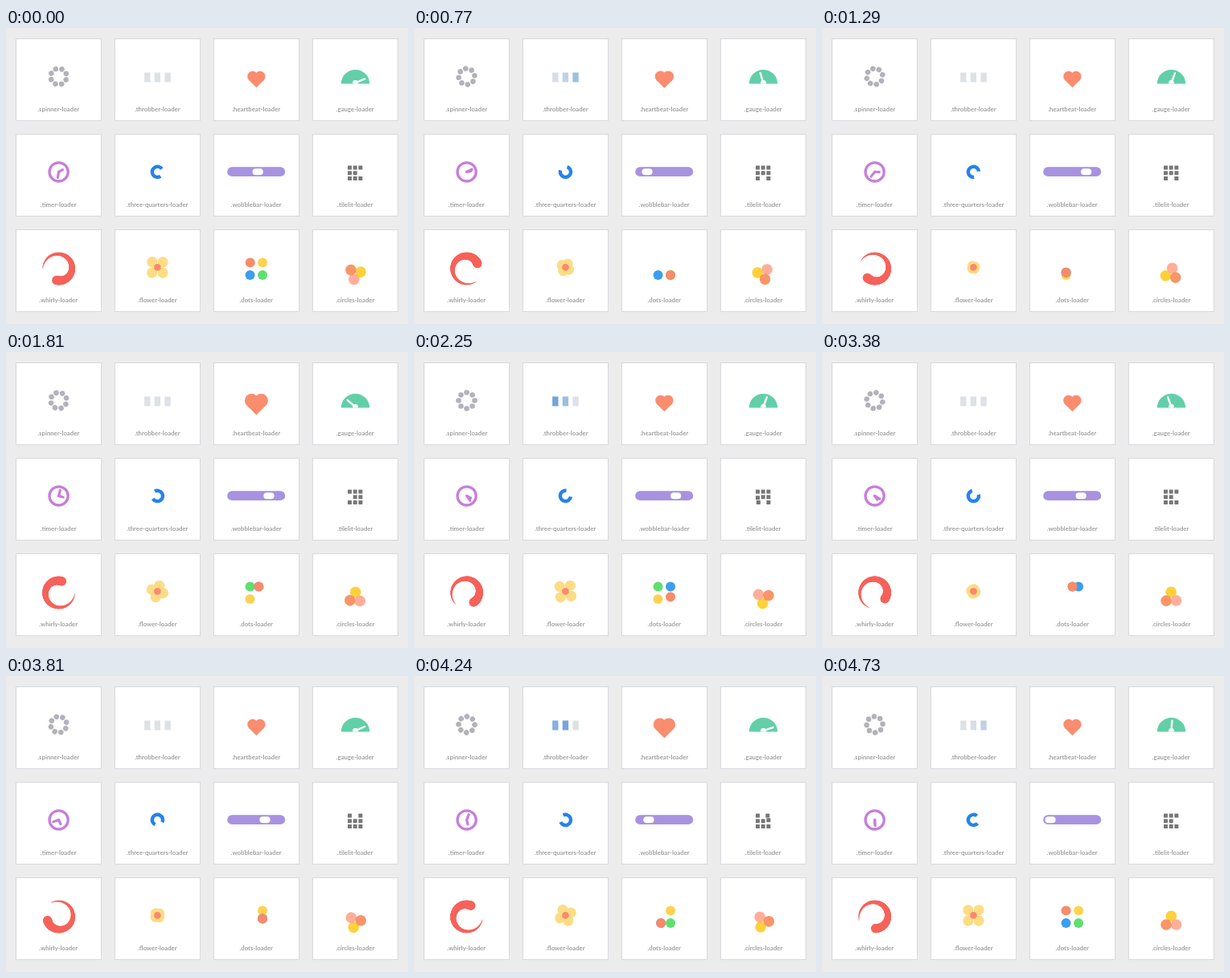
An HTML page with a canvas that plays this animation: 500 by 369 pixels, repeating every 4820 ms.

```html
<!DOCTYPE html>
<html lang="en">
<head>
<meta charset="utf-8">
<title>Loaders</title>
<style>
  html, body { margin: 0; width: 100%; height: 100%; overflow: hidden; background: #ececec; }
  #cards {
    position: absolute; left: 12px; top: 13px; display: grid; gap: 16px 16.5px;
    grid-template-columns: repeat(4, 106.5px); grid-auto-rows: 103px;
  }
  #cards div {
    box-sizing: border-box; padding-top: 82px; border: 1px solid #d9d9df; background: #fff;
    color: #a0a0a0; font: bold 7.75px/10px Lato, sans-serif; text-align: center; white-space: nowrap;
  }
  canvas { position: absolute; left: 0; top: 0; width: 500px; height: 369px; }
</style>
</head>
<body>
<div id="cards"></div>
<canvas></canvas>
<script>
const names = 'spinner throbber heartbeat gauge timer three-quarters wobblebar tilelit whirly flower dots circles';
for (const name of names.split(' ')) {
  const card = document.createElement('div');
  card.textContent = `.${name}-loader`;
  document.getElementById('cards').append(card);
}

const canvas = document.querySelector('canvas');
const dpr = window.devicePixelRatio || 1;
canvas.width = 500 * dpr;
canvas.height = 369 * dpr;
const g = canvas.getContext('2d');

const TAU = Math.PI * 2;
const rad = deg => deg * Math.PI / 180;
const mix = (a, b, f) => a + (b - a) * f;
const clamp = (x, lo, hi) => Math.max(lo, Math.min(hi, x));

// CSS-style cubic-bezier timing function
function bezier(x1, y1, x2, y2) {
  const at = (a, b, s) => 3 * a * s * (1 - s) ** 2 + 3 * b * s * s * (1 - s) + s ** 3;
  return x => {
    let lo = 0, hi = 1;
    for (let i = 0; i < 22; i++) {
      const mid = (lo + hi) / 2;
      if (at(x1, x2, mid) < x) lo = mid; else hi = mid;
    }
    return at(y1, y2, lo);
  };
}
const linear = x => x;
const ease = bezier(.25, .1, .25, 1);
const easeOut = bezier(0, 0, .58, 1);
const easeInOut = bezier(.42, 0, .58, 1);

// Position within a repeating period, in percent
const percent = (t, period) => (t % period) / period * 100;

// Value at p from [percent, value] stops
function keyed(p, stops, curve) {
  let i = 0;
  while (i < stops.length - 2 && p >= stops[i + 1][0]) i++;
  const [p0, v0] = stops[i], [p1, v1] = stops[i + 1];
  return mix(v0, v1, curve(clamp((p - p0) / (p1 - p0), 0, 1)));
}

// Point on a square's outline; corners at 0 (top left), 1, 2, 3 clockwise
function onSquare(u) {
  const wave = v => clamp(Math.abs((v % 4 + 4) % 4 - 2) * 2 - 2, -1, 1);
  return [wave(u + .5 - 2), wave(u - .5 - 2)].map((_, i) => {
    const v = ((u - i + 4) % 4 + 4) % 4;
    return v < 1 ? 2 * v - 1 : v < 2 ? 1 : v < 3 ? 5 - 2 * v : -1;
  });
}

function disc(x, y, r, color) {
  g.fillStyle = color;
  g.beginPath();
  g.arc(x, y, r, 0, TAU);
  g.fill();
}

function pill(x, y, w, h, r, color) {
  g.fillStyle = color;
  g.beginPath();
  g.roundRect(x - w / 2, y - h / 2, w, h, r);
  g.fill();
}

function arc(r, width, color, from = 0, to = TAU) {
  g.strokeStyle = color;
  g.lineWidth = width;
  g.beginPath();
  g.arc(0, 0, r, from, to);
  g.stroke();
}

// Draws in a local frame
function place(x, y, deg, draw) {
  g.save();
  g.translate(x, y);
  g.rotate(rad(deg));
  draw();
  g.restore();
}

function spinner(t) {
  place(65.5, 60.5, t / 1500 * 360, () => {
    for (let i = 0; i < 8; i++) {
      const a = TAU * i / 8;
      disc(10 * Math.cos(a), 10 * Math.sin(a), 3.3, '#b3b2bb');
    }
  });
}

function throbber(t) {
  const idle = [221, 226, 231], lit = [107, 159, 218];
  for (let i = 0; i < 3; i++) {
    const p = percent(t - 150 * (i + 1), 2000);
    const f = keyed(p, [[0, 0], [10, 1], [40, 0], [100, 0]], easeOut);
    const color = idle.map((c, j) => Math.round(mix(c, lit[j], f)));
    pill(188.4 + 12.6 * (i - 1), 61.5, 7.4, 12, 0, `rgb(${color})`);
  }
}

function heartbeat(t) {
  // Two equal beats: up, down, up, slow down
  const beat = [[0, 0], [14, 1], [28, 0], [42, 1], [70, 0], [100, 0]];
  const f = keyed(percent(t, 1300), beat, ease);
  place(311.4, 65 + 1.5 * f, 45, () => {
    const s = 13.1 * (1 + .3 * f), color = '#f98d6e';
    pill(0, 0, s, s, 0, color);
    disc(-s / 2, 0, s / 2, color);
    disc(0, -s / 2, s / 2, color);
  });
}

function gauge(t) {
  const swing = [[0, -50], [10, 20], [20, 60], [25, 60], [40, -20], [54, 70], [62, 70], [70, -20], [84, 22], [100, -50]];
  const x = 434.5, base = 69.6, pivot = 68.4;
  g.save();
  g.fillStyle = '#62cfa8';
  g.beginPath();
  g.arc(x, base, 17.7, Math.PI, 0);
  g.fill();
  g.clip();
  place(x, pivot, keyed(percent(t, 4000), swing, ease), () => pill(0, -7, 2.4, 14, 1.2, '#fff'));
  disc(x, pivot, 3.4, '#fff');
  g.restore();
}

function timer(t) {
  const color = '#c67fdc';
  const hand = (period, length) => place(65.6, 179.4, t / period * 360,
    () => pill(0, length / 2 - .8, 3.2, length + 1.6, 1.6, color));
  place(65.6, 179.4, 0, () => arc(11.6, 3.3, color));
  hand(1250, 8.8);
  hand(15000, 7.2);
}

function threeQuarters(t) {
  place(188.4, 179.4, t / 1250 * 360, () => arc(6.6, 4.4, '#2582ee', rad(45), rad(315)));
}

function wobblebar(t) {
  const slide = [[0, 327], [50, 322], [54, 296], [72, 290], [75, 284], [82, 329], [100, 327]];
  pill(311.2, 179.2, 72, 11.8, 5.9, '#a792e0');
  pill(keyed(percent(t, 4000), slide, ease), 179.2, 13.2, 8, 4, '#fff');
}

// A 3x3 grid whose gap wanders from side to side, two tiles filling it at each move
function tiles(t) {
  const drift = keyed(percent(t, 8000), [[25, 0], [50, 2], [75, -1], [87.5, 0]], linear);
  const side = Math.floor(drift);
  const f = easeInOut(clamp((drift - side - .375) * 4, 0, 1));
  const tile = (x, y) => pill(434.2 + 6.7 * x, 180.8 + 6.7 * y, 5, 5, 0, '#777');
  tile(0, 0);
  for (let i = 1; i < 8; i++) tile(...onSquare(1.5 + side + (i < 3 ? i - f : i) / 2));
}

function whirly(t) {
  place(65.6, 300, t / 1250 * 360, () => {
    for (let i = 0; i <= 140; i++) {
      const f = i / 140, a = rad(91 - 280 * f), r = mix(5.6, .4, f);
      disc((20.3 - r) * Math.cos(a), (20.3 - r) * Math.sin(a), r, '#f6635b');
    }
  });
}

function flower(t) {
  const f = keyed(percent(t, 5000), [[0, 0], [50, 1], [100, 0]], easeInOut);
  const d = 6.65 * (1 - 2 * f);
  place(188.4, 298.4, 1080 * f, () => {
    for (const x of [-d, d]) for (const y of [-d, d]) disc(x, y, 6.6, '#fddc85');
    disc(0, 0, 4.4, '#fa8a6e');
  });
}

// The leader circles the corners; each other dot rides along for two sides, twice per cycle
function dots(t) {
  const step = percent(t, 5000) * .12, whole = Math.floor(step);
  const lead = whole + easeInOut(step - whole);
  const dot = (u, color) => {
    const [x, y] = onSquare(u);
    disc(311.3 + 7.75 * x, 300.3 + 7.75 * y, 6, color);
  };
  const ride = wait => clamp(lead - wait, 0, 2);
  ['#fdd253', '#5fdf70', '#3b9ef0'].forEach((color, i) => {
    const home = i + 1;
    dot(home + ride(home) + ride(home + 6), color);
  });
  dot(lead, '#f98a6a');
}

function circles(t) {
  const turn = keyed(percent(t, 3000), [[0, -720], [50, 720], [100, 0]], easeInOut);
  place(434.3, 306.4, turn, () => {
    g.globalAlpha = .92;
    ['#fdcd28', '#ffa791', '#f98c5c'].forEach((color, i) => {
      const a = rad(120 * i - 90);
      disc(7.2 * Math.cos(a), 7.2 * Math.sin(a), 6.8, color);
    });
  });
}

const LOOP = 4820, STEPS = 56;
const loaders = [
  spinner, throbber, heartbeat, gauge, timer, threeQuarters,
  wobblebar, tiles, whirly, flower, dots, circles
];
const began = performance.now();

function frame() {
  // The picture advances in held steps, each 90 ms of loader time
  const now = (performance.now() - began) % LOOP;
  const step = Math.min(STEPS - 1, Math.floor((now + 18) / 86.3));
  const t = 490035 + 90 * step;
  g.setTransform(dpr, 0, 0, dpr, 0, 0);
  g.clearRect(0, 0, 500, 369);
  for (const draw of loaders) draw(t);
  requestAnimationFrame(frame);
}
frame();
</script>
</body>
</html>
```
